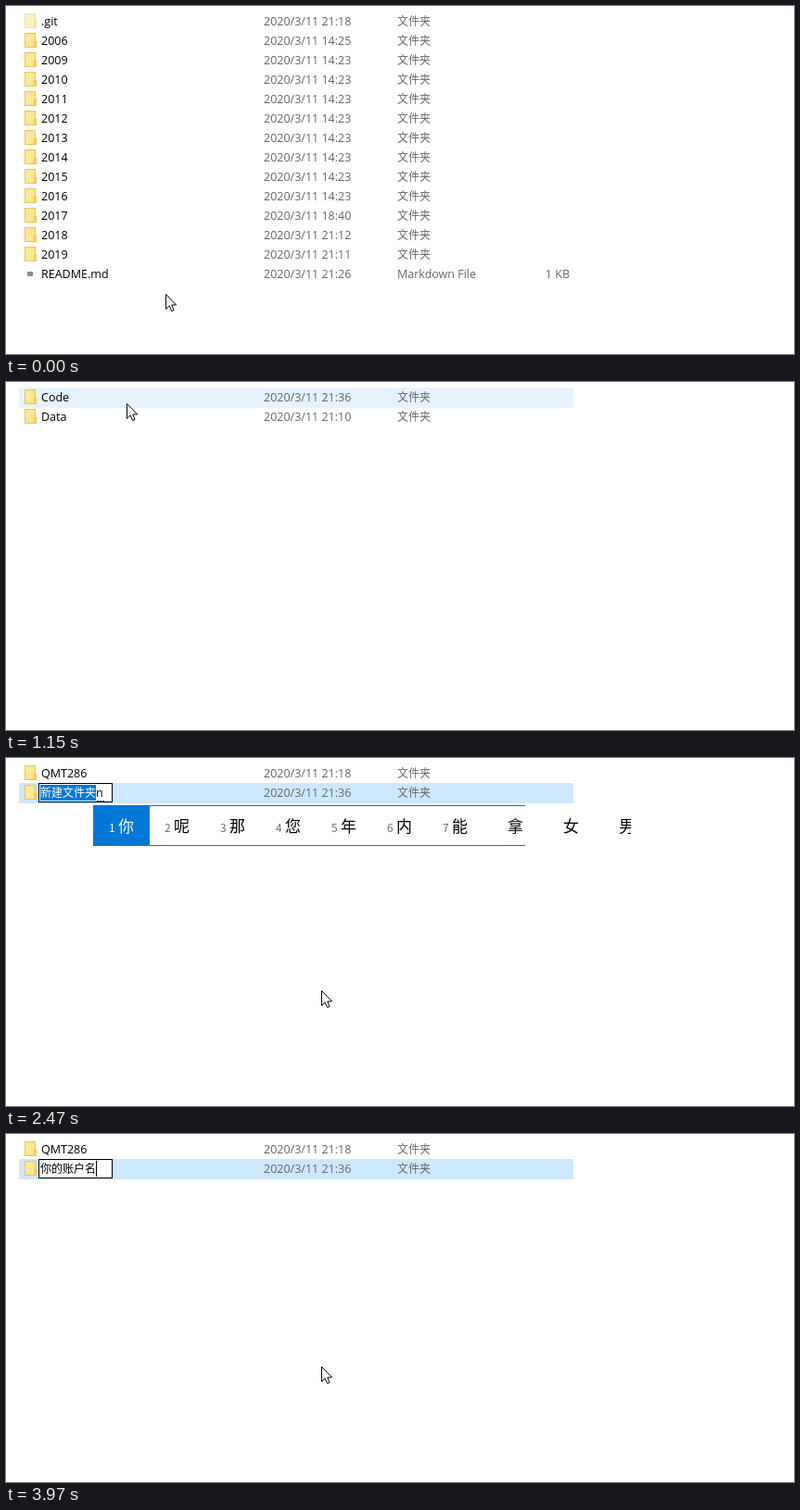
Animation of 850 by 376 pixels, one loop 4.05 s. Source, as an HTML page:

```html
<!DOCTYPE html>
<html lang="zh-CN">
<head>
<meta charset="utf-8">
<title>文件夹</title>
<style>
html, body { margin: 0; width: 100%; height: 100%; overflow: hidden; background: #fff; }
svg { display: block; width: 850px; height: 376px; }
text { font: 12.5px "Open Sans", "Noto Sans", sans-serif; white-space: pre; }
.cjk { font: 12px "Noto Sans CJK SC", "Noto Sans CJK JP", "Noto Sans CJK", sans-serif; }
.big { font-size: 17px; }
</style>
</head>
<body>
<svg id="stage" viewBox="0 0 850 376" xmlns="http://www.w3.org/2000/svg"></svg>
<script>
const stage = document.getElementById('stage');
const LOOP = 4050, GREY = '#666', BLUE = '#0078d7';

// moments at which the screen refreshes
const ticks = [0, 70, 150, 220, 300, 380, 460, 540, 610, 690, 760, 840, 910, 990, 1070,
  1150, 1220, 1300, 1460, 1540, 1610, 1690, 1760, 1840, 1920, 2150, 2470, 2550, 2630, 2710,
  2850, 2940, 3030, 3180, 3260, 3340, 3420, 3490, 3570, 3650, 3740, 3880, 3970];

// pointer path: time, x, y
const path = [[0, 172, 311], [540, 130, 273], [910, 130, 273], [1070, 130, 47], [1150, 130, 23],
  [1460, 130, 23], [1540, 127, 18], [1840, 340, 251]];

const years = [2006, 2009, 2010, 2011, 2012, 2013, 2014, 2015, 2016, 2017, 2018, 2019];
const clock = { 2006: '14:25', 2017: '18:40', 2018: '21:12', 2019: '21:11' };
const root = [
  { name: '.git', time: '21:18', pale: true },
  ...years.map(y => ({ name: String(y), time: clock[y] || '14:23' })),
  { name: 'README.md', time: '21:26', file: true }
];
const yearDir = [{ name: 'Code', time: '21:36' }, { name: 'Data', time: '21:10' }];
const codeDir = [{ name: 'QMT286', time: '21:18' }];
const fresh = { name: '新建文件夹', time: '21:36' };

// typing: time, composition lines, candidates
const typing = [
  [2470, 'n', '你 呢 那 您 年 内 能'],
  [2630, 'ni', '你 尼 泥 腻 妮 拟 逆'],
  [2710, "ni'|d", '你的 你等 你都 年底 难道 你懂 你'],
  [2850, "ni'|de", '你的 尼德 腻的 你得 你 腻 尼'],
  [2940, "ni'|de'z", '你的组 你的 尼德 腻的 你得 你 腻'],
  [3030, "ni'|de'zh", '你的这 你的 尼德 腻的 你得 你 腻'],
  [3180, "ni'|de'zhan", '你的站 你的 尼德 腻的 你得 你 腻'],
  [3260, "ni'|de'zhang", '你的账 你的 尼德 腻的 你得 你 腻'],
  [3340, "ni'|de'zhang'h", '你的账号 你的 尼德 腻的 你得 你 腻'],
  [3490, "ni'|de'zhang'hu", '你的账户 你的 尼德 腻的 你得 你 腻'],
  [3570, "ni'|de'zhang'hu'|m", '你的账户名 你的 尼德 腻的 你得 你 腻'],
  [3650, "ni'|de'zhang'hu'|m", '你的账户名 你的 尼德 你 腻 尼 泥'],
  [3740, "ni'|de'zhang'hu'|mi", '你的账户名 你的 尼德 你 腻 尼 泥']
];

const rect = (x, y, w, h, fill, more = '') =>
  `<rect x="${x}" y="${y}" width="${w}" height="${h}" fill="${fill}" ${more}/>`;
const text = (x, y, s, fill = '#000', cls = '', more = '') =>
  `<text x="${x}" y="${y}" fill="${fill}" class="${cls || (s > '\u3000' ? 'cjk' : '')}" ${more}>${s}</text>`;
const line = (d, stroke, more = '') => `<path d="${d}" fill="none" stroke="${stroke}" ${more}/>`;

const last = (list, t) => list.filter(k => k[0] <= t).pop();

function pointerAt(t) {
  const a = last(path, t), b = path[path.indexOf(a) + 1];
  if (!b) return [a[1], a[2]];
  const p = (t - a[0]) / (b[0] - a[0]), e = p * p * (3 - 2 * p);
  return [1, 2].map(i => Math.round(a[i] + (b[i] - a[i]) * e));
}

function folder(y, pale) {
  return `<g opacity="${pale ? 0.55 : 1}">` +
    rect(20.5, y + 2.5, 11, 15, '#ffe693', 'stroke="#e9c44f"') +
    rect(30.5, y + 11.5, 2, 6, '#ffe07a', 'stroke="#e9c44f"') + '</g>';
}

function row(item, i, mode) {
  const y = 6 + 21 * i, base = y + 15;
  let s = '';
  if (mode === 'hover') s += rect(14, y, 598, 22, '#e5f3ff');
  if (mode === 'edit') s += rect(14, y, 598, 22, '#cde8ff');
  if (mode === 'select') s += rect(14.5, y + 0.5, 597, 21, '#cce8ff', 'stroke="#99d1ff"');
  s += item.file ? rect(23, y + 8, 6, 5, '#8a8a8a') : folder(y, item.pale);
  if (mode !== 'edit') s += text(38, base, item.name);
  s += text(278, base, '2020/3/11 ' + item.time, GREY);
  s += text(422, base, item.file ? 'Markdown File' : '文件夹', GREY);
  if (item.file) s += text(608, base, '1 KB', GREY, '', 'text-anchor="end"');
  return s;
}

function rows(list, tip, picked, mode = 'select') {
  const over = Math.floor((tip[1] - 6) / 21);
  return list.map((item, i) => row(item, i, i === picked ? mode : i === over ? 'hover' : '')).join('');
}

function candidates(words, y, opening) {
  let x = 94, s = '';
  words.forEach((w, i) => {
    const wide = 43 + 17 * w.length, first = i === 0;
    if (first) s += rect(94, y, wide + 1, 44, BLUE);
    if (i < 7) s += text(x + 17, y + 29, i + 1, first ? '#fff' : '#707070');
    s += text(x + 27, y + 29, w, first ? '#fff' : '#000', 'cjk big');
    x += wide;
  });
  if (opening) {
    return `<clipPath id="cut">${rect(94, y, 580, 44, '#000')}</clipPath><g clip-path="url(#cut)">${s}</g>` +
      line(`M94 ${y + 0.5}H560M94 ${y + 43.5}H560`, BLUE);
  }
  const cx = x + 23.5, cy = y + 22;
  return rect(94, y, x - 49, 44, '#fff') + s +
    line(`M94.5 ${y + 0.5}H${x + 45.5}V${y + 43.5}H94.5ZM${x + 1.5} ${y}v44`, BLUE) +
    `<circle cx="${cx}" cy="${cy}" r="7.7" fill="none" stroke="#000" stroke-width="1.2"/>` +
    `<circle cx="${cx - 2.8}" cy="${cy - 2.3}" r="1.1"/><circle cx="${cx + 2.8}" cy="${cy - 2.3}" r="1.1"/>` +
    line(`M${cx - 4.3} ${cy + 1.8}q4.3 5 8.6 0`, '#000', 'stroke-width="1.2"');
}

function editor(t) {
  let s = rect(35.5, 27.5, 79, 20, '#fff', 'stroke="#000"');
  if (t >= 3880) return s + text(37, 42, '你的账户名') + line('M97.5 29V46', '#000');
  s += rect(37, 29, 60, 17, BLUE) + text(37, 42, fresh.name, '#fff');
  const typed = last(typing, t);
  if (!typed) return s + (t < 2150 ? line('M97.5 29V46', '#000') : '');
  const parts = typed[1].split('|');
  parts.forEach((p, i) => s += text(i ? 36 : 97, 42 + 19 * i, p));
  s += parts.length > 1 ? line('M110 46.5h4', '#000')
    : line(`M98 46.5H${parts[0].length > 1 ? 109 : 106}`, '#000', 'stroke-dasharray="2 1"');
  const opening = t < 2550;
  const words = (typed[2] + (opening ? ' 拿 女 男' : '')).split(' ');
  return s + candidates(words, 32 + 19 * parts.length, opening);
}

function pointer([x, y], halo) {
  return (halo ? `<circle cx="${x}" cy="${y}" r="12" fill="#ff0" fill-opacity=".5"/>` : '') +
    `<path transform="translate(${x} ${y})" d="M.5 .5V16.6L4.2 13L6.7 18.6L9.1 17.5L6.7 12H11.6Z" fill="#fff" stroke="#000"/>`;
}

function draw(t) {
  const tip = pointerAt(t), within = (a, b) => t >= a && t < b;
  const halo = within(610, 760) || within(840, 910) || within(1220, 1300) || within(1460, 1540);
  let s;
  if (t < 910) s = rows(root, tip, t >= 690 ? 12 : -1);
  else if (within(910, 990) || within(1540, 1610)) s = text(407, 28, '正在处理...', GREY);
  else if (t < 1540) s = rows(yearDir, tip, t >= 1220 ? 0 : -1);
  else if (t < 1840) s = rows(codeDir, tip, -1);
  else if (t < 1920) s = rows([...codeDir, fresh], tip, 1);
  else s = rows([...codeDir, fresh], tip, 1, 'edit') + editor(t);
  if (!within(3880, 3970)) s += pointer(tip, halo);
  stage.innerHTML = s;
}

let shown = -1;
function frame() {
  const now = performance.now() % LOOP;
  const tick = ticks.filter(k => k <= now).pop();
  if (tick !== shown) draw(shown = tick);
  requestAnimationFrame(frame);
}
frame();
</script>
</body>
</html>
```
